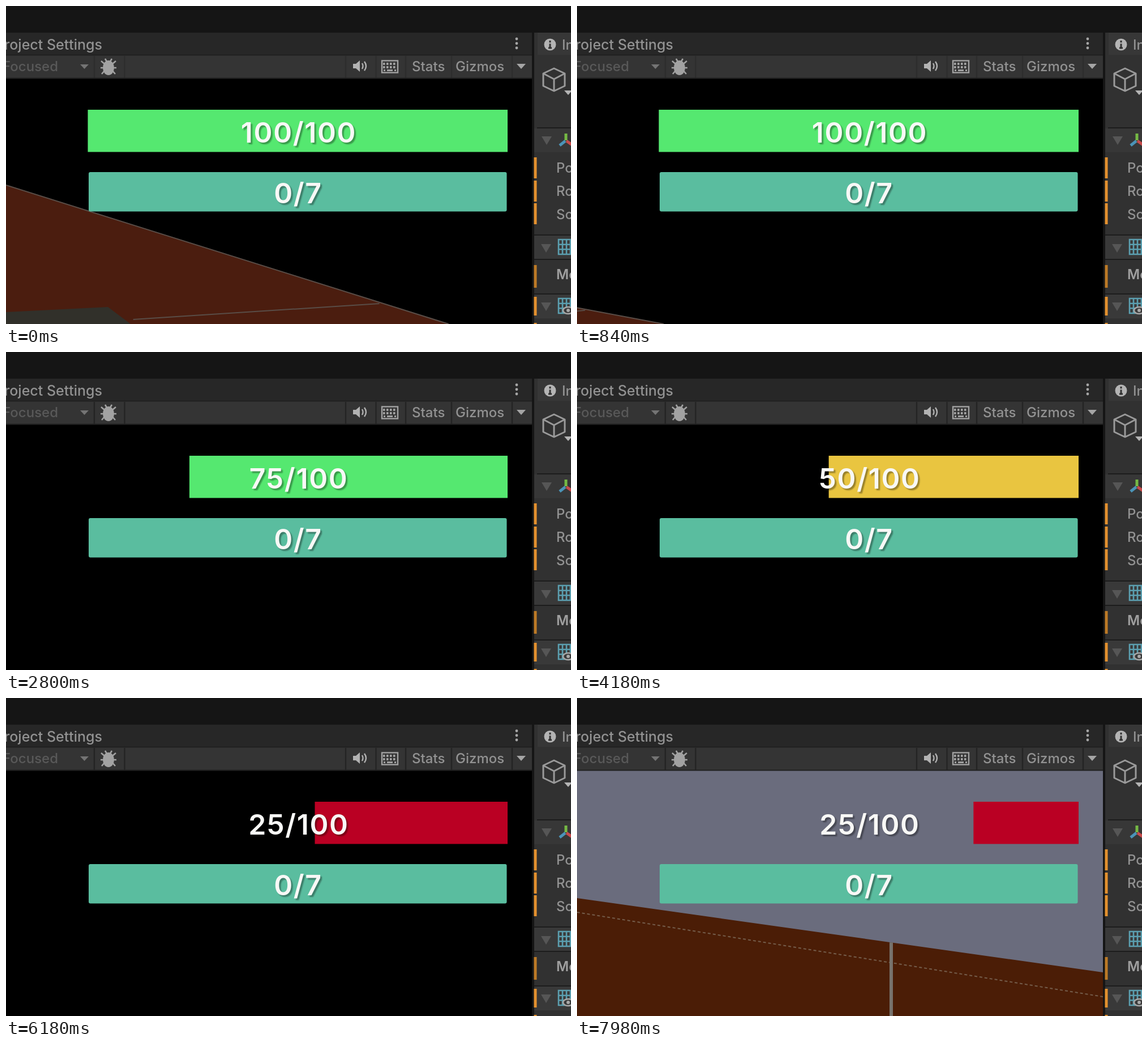
Write an HTML page that moves like this. It is 998 px wide and 561 px high and loops after 8 s.

```html
<!DOCTYPE html>
<html lang="en">
<head>
<meta charset="utf-8">
<title>Health bar</title>
<style>
  html, body { margin: 0; width: 100%; height: 100%; overflow: hidden; background: #000; }
  svg { display: block; width: 998px; height: 561px; filter: blur(.7px); }
  text { font-family: Inter, "Open Sans", sans-serif; }
  .ui text { font-size: 24px; font-weight: 500; fill: #929292; }
  .ui .title { font-size: 25px; }
  .num { font-size: 50px; font-weight: 600; fill: #f8f8f6; text-anchor: middle; letter-spacing: 1.6px;
         text-shadow: 3px 3px 2px rgba(0, 0, 0, .34); }
</style>
</head>
<body>
<svg viewBox="0 0 998 561">
  <defs>
    <clipPath id="view"><rect y="128" width="929" height="433"/></clipPath>
    <g id="grid" fill="none" stroke="#5b9fb0" stroke-width="2.6">
      <path d="M1 1H29V27H1ZM1 9.7H29M1 18.3H29M8 1V27M15 1V27M22 1V27"/>
    </g>
    <path id="fold" d="M-9 -7H9L0 8Z" fill="#565656"/>
  </defs>

  <rect width="998" height="561" fill="#000"/>
  <g clip-path="url(#view)">
    <rect id="sky" y="128" width="929" height="433" fill="#6a6c7d"/>
    <g id="floorA">
      <polygon id="landA" fill="#4b1d0f"/>
      <polygon id="wedge" fill="#31302a"/>
      <path id="edgeA" fill="none" stroke="#594d47" stroke-width="2"/>
    </g>
    <g id="floorB">
      <polygon id="landB" fill="#4b1d06"/>
      <path id="seam" fill="none" stroke="#665b56" stroke-width="2.5"/>
      <g id="detail">
        <path id="dash" fill="none" stroke="#745c4a" stroke-width="2" stroke-dasharray="5 4"/>
        <path id="post" fill="none" stroke="#77726c" stroke-width="6"/>
      </g>
    </g>
  </g>

  <rect id="bar" y="183" height="74.5"/>
  <rect x="146" y="293" width="738.5" height="69.5" rx="3" fill="#5abd9f"/>
  <text id="hp" class="num" x="517" y="241"></text>
  <text class="num" x="516" y="348">0/7</text>

  <g class="ui">
    <rect width="998" height="48" fill="#151515"/>
    <rect y="47" width="930" height="39" fill="#272727"/>
    <rect y="86" width="930" height="42" fill="#343434"/>
    <path d="M0 86.5H930M0 127.5H930" stroke="#202020" stroke-width="2"/>
    <path id="seps" d="M156 88V127M209.500 88V127M600 88V127M653.500 88V127M706 88V127M787 88V127M894 88V127"
          stroke="#242424" stroke-width="2.500"/>
    <text class="title" x="170" y="77" text-anchor="end">Project Settings</text>
    <text x="92" y="115" text-anchor="end" style="fill:#595959">Focused</text>
    <text x="717" y="115">Stats</text>
    <text x="794" y="115">Gizmos</text>
    <g fill="#a5a5a5">
      <path d="M131 103H146L138.500 111Z" fill="#747474"/>
      <path d="M902 102H918L910 111Z"/>
      <circle cx="902" cy="58" r="2.400"/><circle cx="902" cy="66" r="2.400"/><circle cx="902" cy="74" r="2.400"/>
    </g>
    <g transform="translate(181 107)">
      <path d="M-13 -10L-6 -4M13 -10L6 -4M-14 2H14M-12 13L-6 6M12 13L6 6M-6 -14L-3 -9M6 -14L3 -9"
            stroke="#a2a2a2" stroke-width="2.600"/>
      <ellipse cy="2" rx="10" ry="13" fill="#a2a2a2"/>
    </g>
    <g transform="translate(625 106)" fill="none" stroke="#b2b2b2" stroke-width="2.400">
      <path d="M-12 -4H-7L0 -10V10L-7 4H-12Z" fill="#b2b2b2" stroke="none"/>
      <path d="M4 -5Q7 0 4 5M8 -8Q14 0 8 8"/>
    </g>
    <g transform="translate(678 107)" fill="none" stroke="#a2a2a2" stroke-width="2.400">
      <rect x="-14" y="-10.500" width="28" height="21"/>
      <path d="M-12 -5H12M-12 1H12" stroke-width="4" stroke-dasharray="3.500 2.500"/>
      <path d="M-11 6.500H-8M-5 6.500H5M8 6.500H11" stroke-width="3"/>
    </g>

    <rect x="930" y="47" width="68" height="514" fill="#313131"/>
    <rect x="939" y="47" width="59" height="39" fill="#373737"/>
    <rect x="929" y="47" width="4" height="514" fill="#151515"/>
    <rect x="933" y="216" width="65" height="42" fill="#373737"/>
    <rect x="933" y="405" width="65" height="42" fill="#393939"/>
    <rect x="933" y="509" width="65" height="42" fill="#393939"/>
    <path d="M938 215H998M933 404H998M933 447H998M933 508H998" stroke="#1c1c1c" stroke-width="2"/>
    <circle cx="961" cy="68" r="10.500" fill="#b4b4b4"/>
    <path d="M961 61V64.500M961 66.500V75M958 74H964" stroke="#303030" stroke-width="3"/>
    <text x="982" y="77">Inspector</text>
    <path d="M968 110L987 119V141L968 150L949 141V119ZM949 119L968 129L987 119M968 129V150"
          fill="none" stroke="#9a9a9a" stroke-width="3" stroke-linejoin="round"/>
    <path d="M986 149H1000L993 157Z" fill="#b4b4b4"/>
    <use href="#fold" x="955" y="237"/>
    <use href="#fold" x="954" y="427"/>
    <use href="#fold" x="954" y="530"/>
    <g stroke-width="5">
      <path d="M989 225V237" stroke="#75b944"/>
      <path d="M988 238L978 246" stroke="#4b94b8"/>
      <path d="M990 238L1000 245" stroke="#c84b4b"/>
    </g>
    <text x="972" y="294">Position</text>
    <text x="972" y="335">Rotation</text>
    <text x="972" y="376">Scale</text>
    <text x="972" y="482" style="font-weight:600;fill:#a0a0a0">Mesh</text>
    <use href="#grid" x="975" y="411"/>
    <use href="#grid" x="975" y="515"/>
    <ellipse cx="993" cy="537" rx="9" ry="6" fill="#393939" stroke="#a8a8a8" stroke-width="2.500"/>
    <circle cx="993" cy="537" r="3" fill="#a8a8a8"/>
    <path d="M935 267V304M935 308V345M935 348V385M935 513V546M935 559V561" stroke="#e3912f" stroke-width="5"/>
    <path d="M935 457V497" stroke="#bd7a26" stroke-width="5"/>
  </g>
</svg>
<script>
const LOOP = 8000, RIGHT = 886, FULL = 741.5, RATE = 3.5 / 1000;
const $ = id => document.getElementById(id);
const set = (id, attrs) => { for (const k in attrs) $(id).setAttribute(k, attrs[k]); };
const ramp = (t, a, b) => Math.min(1, Math.max(0, (t - a) / (b - a)));

// Each hit: moment shown, start of the drain, new value, bar colour
const hits = [
  [1820, 1817, 75, '#55e870'],
  [3920, 3905, 50, '#e9c540'],
  [6180, 6130, 25, '#ba0023']
];

// time, left y, x at the bottom, inner line (x1 y1 x2 y2), wedge (left y, tip x, tip y)
const leave = [
  [0, 316, 782, 225, 553, 660, 525, 540, 180, 531],
  [220, 330, 750, 155, 544, 545, 508, 540, 198, 537],
  [440, 371, 670, 50, 527, 375, 478, 540, 215, 546],
  [630, 440, 463, -90, 540, 200, 501, 560, 225, 570],
  [820, 530, 165, -270, 560, 20, 534, 600, 225, 600],
  [1120, 563, -4, -300, 600, -60, 575, 620, 225, 620]
];
// time, left y, right y
const enter = [
  [7560, 520, 725],
  [7580, 511, 709],
  [7980, 353, 484]
];

function at(keys, t) {
  let i = 0;
  while (i < keys.length - 2 && t > keys[i + 1][0]) i++;
  const a = keys[i], b = keys[i + 1], p = ramp(t, a[0], b[0]);
  return a.map((v, n) => v + (b[n] - v) * p).slice(1);
}

function drawHealth(t) {
  let value = 100, color = '#55e870', left = RIGHT - FULL;
  for (const [shown, start, hp, fill] of hits) {
    if (t < shown) break;
    value = hp;
    color = fill;
    left += FULL / 4 * (1 - Math.exp(-RATE * (t - start)));
  }
  set('bar', { x: left, width: RIGHT - left, fill: color });
  const label = value + '/100';
  if ($('hp').textContent !== label) $('hp').textContent = label;
}

function drawLeave(t) {
  const on = t < 1120;
  set('floorA', { visibility: on ? 'visible' : 'hidden' });
  if (!on) return;
  const [y, x, x1, y1, x2, y2, wy, wx, wt] = at(leave, t);
  set('landA', { points: `0,${y} ${x},561 0,561` });
  set('wedge', { points: `0,${wy} ${wx},${wt} ${wx + 40},561 0,620` });
  set('edgeA', { d: `M0 ${y}L${x} 561M${x1} ${y1}L${x2} ${y2}` });
}

function drawEnter(t) {
  const on = t >= 7560, light = ramp(t, 7690, 7950);
  set('floorB', { visibility: on ? 'visible' : 'hidden' });
  set('sky', { opacity: light });
  if (!on) return;
  const [l, r] = at(enter, t);
  const mid = l + (r - l) * 555 / 929;
  set('landB', { points: `0,${l} 929,${r} 929,900 0,900` });
  set('seam', { d: `M0 ${l + 25}Q25 ${l + 13} 55 ${l + 10}`, opacity: 1 - ramp(t, 7600, 7750) });
  set('detail', { opacity: light });
  set('dash', { d: `M0 ${l + 25}L929 ${r + 43}` });
  set('post', { d: `M555 ${mid}V561` });
}

function draw() {
  const t = performance.now() % LOOP;
  drawHealth(t);
  drawLeave(t);
  drawEnter(t);
  set('seps', { opacity: t < 2640 ? .4 : 1 });
  requestAnimationFrame(draw);
}
draw();
</script>
</body>
</html>
```
